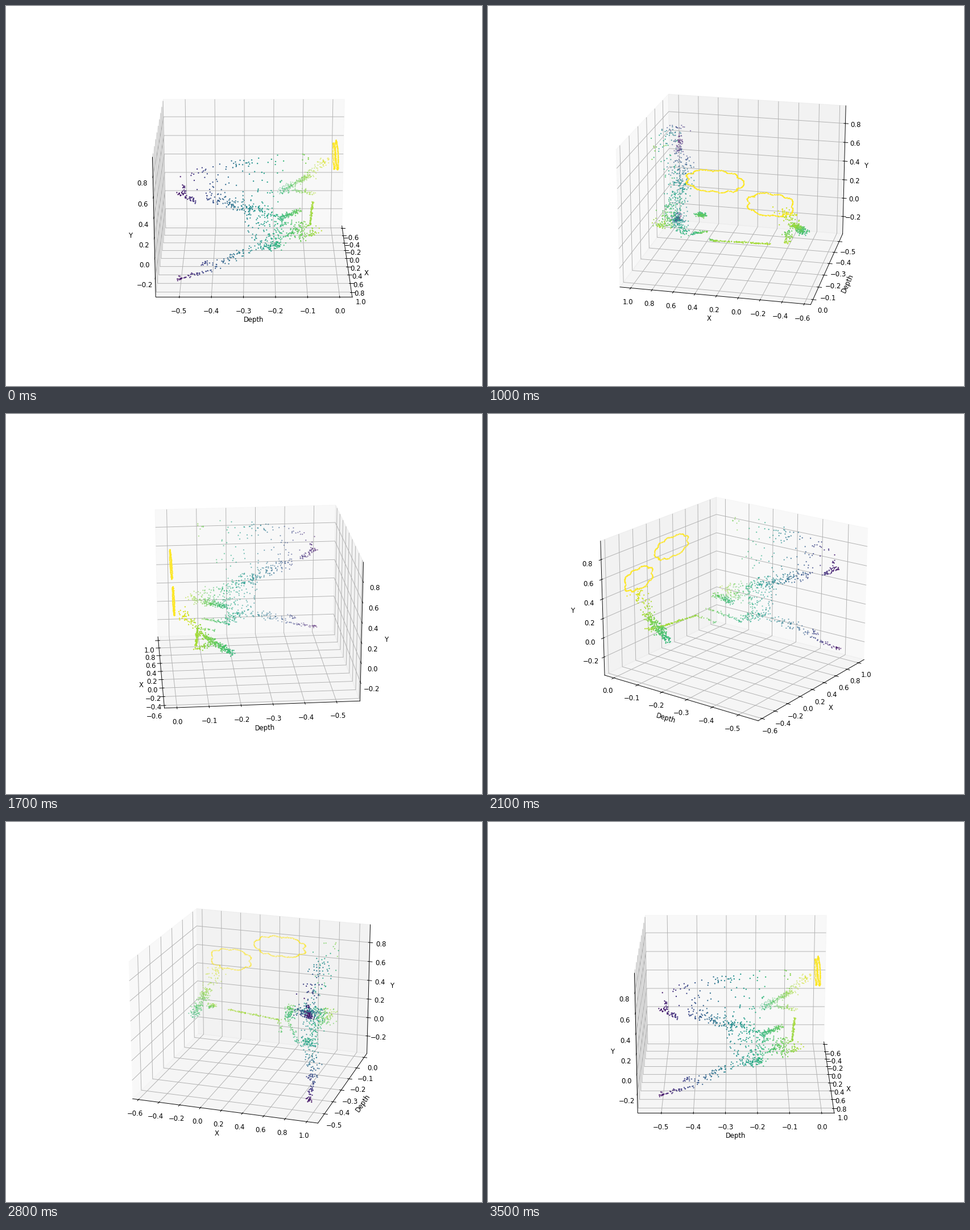
Recreate the animation shown at these times as a matplotlib script. Size 837 by 669 pixels, loop 3.6 s.

```python
import numpy as np
import matplotlib.pyplot as plt
from matplotlib.animation import FuncAnimation

W, H, DPI = 837, 669, 83.7
FRAMES, INTERVAL = 36, 100
rng = np.random.default_rng(11)


# Points are (x, height, depth)
def jitter(n, size):
    """Noise that is widest across x and narrowest in depth."""
    return rng.normal(0, size, (n, 3)) * (2.5, 1, 0.6)


def strand(start, end, n, size, lift=0):
    """Points scattered along a line that may bow upwards."""
    t = rng.random((n, 1))
    bow = 4 * lift * t * (1 - t) * (0, 1, 0)
    return (1 - t) * start + t * np.array(end) + bow + jitter(n, size)


def sheet(top, bottom, n, size):
    """Points scattered between two lines, each a pair of ends."""
    t, s = rng.random((2, n, 1))
    upper, lower = ((1 - t) * a + t * np.array(b) for a, b in (top, bottom))
    return (1 - s) * upper + s * lower + jitter(n, size)


def cloud(cx, cy, rx, ry, lobes, n):
    """Scalloped oval at zero depth."""
    a = np.linspace(0, 2 * np.pi, n, endpoint=False)
    lobe = a + 0.12 * np.sin(3 * a)
    r = 0.87 + 0.13 * np.abs(np.sin(lobes * lobe / 2))
    c, s = np.cos(a), np.sin(a)
    x = cx + rx * r * c
    y = cy + ry * r * np.sign(s) * np.abs(s) ** 0.75
    return np.column_stack([x, y, 0 * a]) + rng.normal(0, 0.0022, (n, 3)) * (1, 1, 0.5)


clouds = [cloud(.24, .704, .265, .11, 9, 180),
          cloud(-.264, .516, .217, .113, 8, 155)]

far_tree = [strand((-.47, .06, -.175), (-.43, .26, -.075), 190, .011),
            strand((-.41, .28, -.08), (-.38, .45, -.012), 55, .018),
            strand((-.36, .12, -.13), (-.38, .07, -.06), 55, .009)]

shore = [strand((.33, .01, -.085), (-.22, .045, -.07), 100, .003),
         strand((.39, -.06, -.15), (.31, .01, -.085), 18, .003),
         strand((.38, .08, -.10), (.60, -.075, -.20), 45, .005),
         strand((.49, .15, -.185), (.46, .22, -.12), 95, .010)]

canopy = (.90, .74, -.48), (.86, .88, -.10)
ridge = (.84, .50, -.42), (.73, .27, -.20)
near_tree = [strand(*canopy, 48, .02, lift=.035),
             strand(*ridge, 150, .022),
             sheet(canopy, ridge, 60, .02),
             sheet(((.78, .33, -.30), (.80, .22, -.09)),
                   ((.72, -.05, -.28), (.80, .12, -.08)), 170, .014),
             strand((.94, .585, -.51), (.91, .485, -.445), 40, .007),
             strand((.93, .66, -.485), (.92, .55, -.48), 14, .005),
             strand((.80, .06, -.12), (.80, .16, -.07), 35, .014)]

bank = [strand((.95, -.28, -.51), (.92, -.20, -.40), 45, .006),
        strand((.90, -.15, -.43), (.90, -.12, -.41), 14, .006),
        strand((.91, -.18, -.40), (.72, -.03, -.20), 90, .015, lift=.04),
        strand((.70, -.06, -.22), (.66, -.05, -.17), 40, .014)]

points = np.vstack(clouds + far_tree + shore + near_tree + bank)
x, height, depth = np.clip(points, (-.544, -.303, -.535), (.99, .899, 0)).T

fig = plt.figure(figsize=((W + 1e-6) / DPI, (H + 1e-6) / DPI), dpi=DPI)
ax = fig.add_subplot(projection="3d")
ax.scatter(x, depth, height, c=depth, cmap="viridis", s=1, vmin=-.535, vmax=0)
ax.set(xlabel="X", ylabel="Depth", zlabel="Y",
       xticks=np.arange(-3, 6) / 5, yticks=np.arange(-5, 1) / 10,
       zticks=np.arange(-1, 5) / 5)
ax.set(xlim=(-.658, 1.102), ylim=(-.574, .039), zlim=(-.391, .986))


def update(i):
    ax.view_init(elev=20, azim=360 * i / (FRAMES - 1))
    return ()


anim = FuncAnimation(fig, update, frames=FRAMES, interval=INTERVAL,
                     repeat=True, repeat_delay=0)
plt.show()
```
